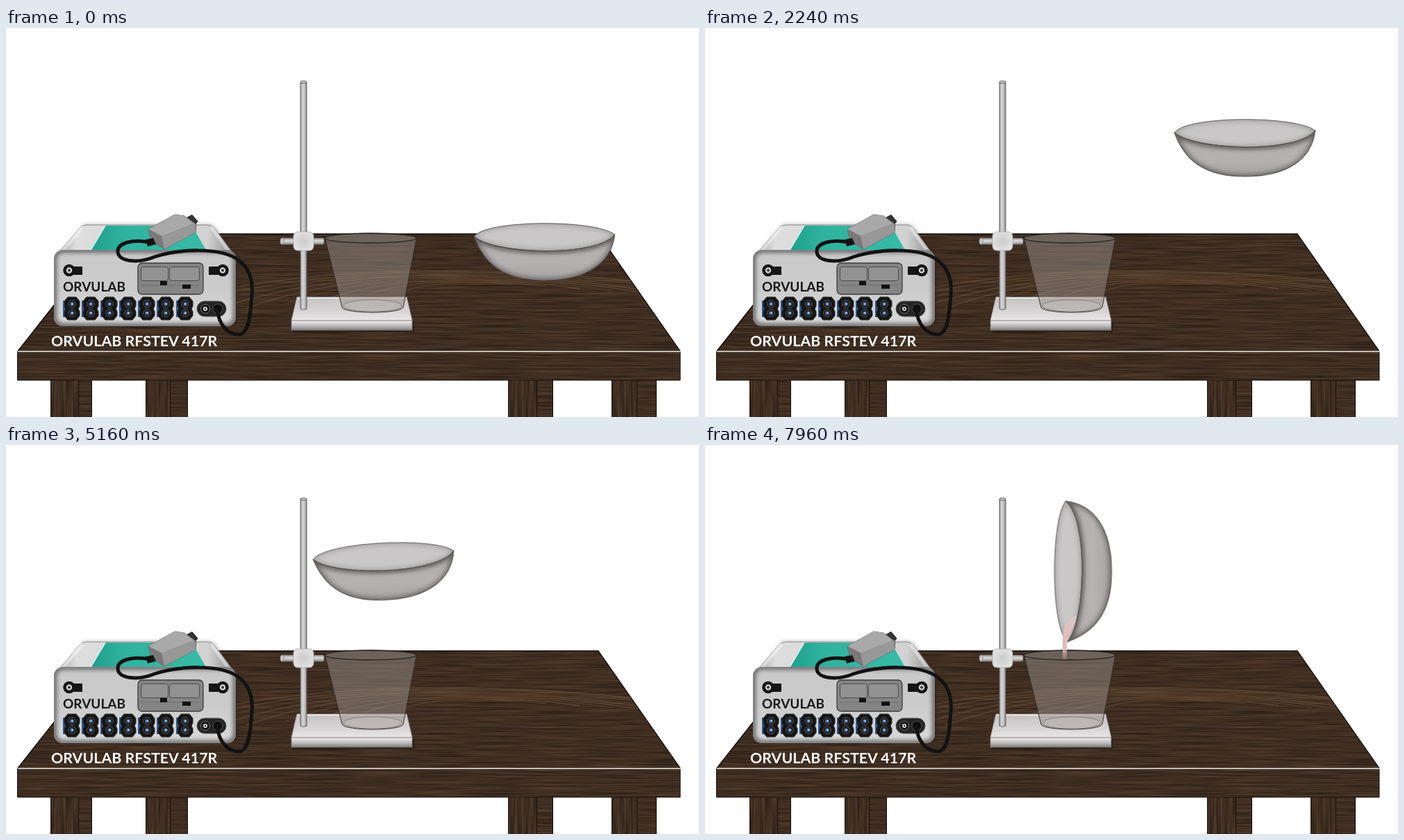
Animation of 998 by 561 pixels, one loop 8000 ms. Source, as an HTML page:

```html
<!DOCTYPE html>
<html lang="en">
<head>
<meta charset="utf-8">
<title>Filling the beaker</title>
<style>
  html, body { margin: 0; width: 100%; height: 100%; overflow: hidden; background: #fff; }
  svg { position: absolute; left: 0; top: 0; width: 998px; height: 561px; display: block; }
  text { font-family: Lato, "Open Sans", sans-serif; font-weight: 700; }
  #bowl { transform: translate(775px, 323px); }
</style>
</head>
<body>
<svg viewBox="0 0 998 561">
  <defs>
    <filter id="grain" x="0" y="0" width="100%" height="100%" color-interpolation-filters="sRGB">
      <feTurbulence type="fractalNoise" baseFrequency=".012 .45" numOctaves="3" seed="7"/>
      <feColorMatrix values=".24 0 0 0 .125  .18 0 0 0 .088  .13 0 0 0 .063  0 0 0 0 1"/>
      <feComposite in2="SourceGraphic" operator="in"/>
    </filter>
    <filter id="legGrain" x="0" y="0" width="100%" height="100%" color-interpolation-filters="sRGB">
      <feTurbulence type="fractalNoise" baseFrequency=".3 .015" numOctaves="3" seed="4"/>
      <feColorMatrix values=".24 0 0 0 .125  .18 0 0 0 .088  .13 0 0 0 .063  0 0 0 0 1"/>
      <feComposite in2="SourceGraphic" operator="in"/>
    </filter>
    <filter id="soft" x="-20%" y="-20%" width="140%" height="140%"><feGaussianBlur stdDeviation="3"/></filter>
    <filter id="soft1" x="-20%" y="-20%" width="140%" height="140%"><feGaussianBlur stdDeviation="1.3"/></filter>
    <linearGradient id="pole">
      <stop offset="0" stop-color="#a0a0a0"/><stop offset=".35" stop-color="#d4d4d4"/>
      <stop offset=".65" stop-color="#c6c6c6"/><stop offset="1" stop-color="#8c8c8c"/>
    </linearGradient>
    <linearGradient id="bar" x2="0" y2="1">
      <stop offset="0" stop-color="#999"/><stop offset=".45" stop-color="#dcdcdc"/><stop offset="1" stop-color="#888"/>
    </linearGradient>
    <linearGradient id="plate" x2="0" y2="1">
      <stop offset="0" stop-color="#c4c1c1"/><stop offset=".6" stop-color="#d6d4d4"/><stop offset="1" stop-color="#e8e6e6"/>
    </linearGradient>
    <linearGradient id="plateFront" x2="0" y2="1">
      <stop offset="0" stop-color="#f0efef"/><stop offset=".55" stop-color="#bcb9b9"/><stop offset="1" stop-color="#7d7a7a"/>
    </linearGradient>
    <radialGradient id="knob">
      <stop offset="0" stop-color="#cbcbcb"/><stop offset="1" stop-color="#e0e0e0"/>
    </radialGradient>
    <linearGradient id="lid">
      <stop offset="0" stop-color="#9c9c9c"/><stop offset=".12" stop-color="#dedede"/>
      <stop offset=".85" stop-color="#d2d2d2"/><stop offset="1" stop-color="#858585"/>
    </linearGradient>
    <linearGradient id="face" x2="0" y2="1">
      <stop offset="0" stop-color="#c9c9c9"/><stop offset=".5" stop-color="#cbcbcb"/><stop offset="1" stop-color="#dadada"/>
    </linearGradient>
    <linearGradient id="teal">
      <stop offset="0" stop-color="#1f9f8c"/><stop offset=".3" stop-color="#2fb39f"/><stop offset="1" stop-color="#37bba7"/>
    </linearGradient>
    <linearGradient id="shell" x2="0" y2="1">
      <stop offset="0" stop-color="#aeaaaa"/><stop offset=".6" stop-color="#b6b2b2"/><stop offset="1" stop-color="#a8a4a4"/>
    </linearGradient>
    <linearGradient id="fade" x2="0" y2="1">
      <stop offset=".8" stop-color="#fff"/><stop offset="1" stop-color="#000"/>
    </linearGradient>
    <linearGradient id="liquid" x2="0" y2="1">
      <stop offset="0" stop-color="#d9c9c9"/><stop offset=".4" stop-color="#e2bdbb"/><stop offset="1" stop-color="#dfb6b3"/>
    </linearGradient>
    <path id="shellShape" d="M-101-22C-87 16-60 41 0 41C63 41 97 15 101.500-25C75 8-70 4-101-22Z"/>
    <path id="mouthShape" d="M-101-22C-85-47 75-47 101.500-25C75 8-70 4-101-22Z"/>
    <path id="frontRim" d="M-101-22C-70 4 75 8 101.500-25"/>
    <clipPath id="topClip"><path d="M150 297H853L971 466H17Z"/></clipPath>
    <clipPath id="faceClip"><rect x="69" y="320" width="262" height="110" rx="13"/></clipPath>
    <clipPath id="shellClip"><use href="#shellShape"/></clipPath>
    <clipPath id="mouthClip"><use href="#mouthShape"/></clipPath>
    <mask id="wipe" maskUnits="userSpaceOnUse" x="490" y="230" width="70" height="90">
      <rect id="wipeEdge" x="490" y="-100" width="70" height="100" fill="url(#fade)"/>
    </mask>
  </defs>

  <!-- table -->
  <g id="legs"></g>
  <path d="M150 297H853L971 466H17Z" filter="url(#grain)"/>
  <g id="rings" clip-path="url(#topClip)" fill="none" stroke="#8e7050" stroke-opacity=".32"></g>
  <path d="M17 466L150 297H853L971 466" fill="none" stroke="#0e0805" stroke-width="1.300"/>
  <rect x="16" y="466" width="955" height="42" filter="url(#grain)"/>
  <path d="M16.500 467V508H971V467" fill="none" stroke="#1c120c"/>
  <path d="M17 466.500H971" stroke="#f4f0ec" stroke-width="1.400"/>

  <!-- stand -->
  <path d="M411 424H587V438H413Z" opacity=".5" filter="url(#soft1)"/>
  <path d="M419 388H577L585 422H411Z" fill="url(#plate)" stroke="#a09c9c" stroke-width=".8"/>
  <path d="M420 389.500H576" stroke="#f2f1f1" stroke-width="1.500"/>
  <rect x="411" y="422" width="174" height="14" fill="url(#plateFront)" stroke="#777373" stroke-width=".8"/>
  <path d="M424 78V405Q428.500 408 433 405V78Z" fill="url(#pole)" stroke="#555" stroke-width=".9"/>
  <ellipse cx="428.500" cy="78" rx="4.500" ry="1.800" fill="#c8c8c8" stroke="#444" stroke-width=".8"/>
  <rect x="396" y="303" width="62" height="9" rx="2" fill="url(#bar)" stroke="#777" stroke-width=".7"/>
  <ellipse cx="397.500" cy="307.500" rx="2.500" ry="4.500" fill="#c9c9c9" stroke="#777" stroke-width=".7"/>
  <rect x="414" y="294" width="29" height="27" rx="6" fill="url(#knob)" stroke="#a5a5a5" stroke-width=".8"/>

  <!-- beaker -->
  <path d="M459.500 303C470 294 580 294 591 303L572 403C566 412.500 490 412.500 484 403Z" fill="#97908a" fill-opacity=".5" stroke="#332f2c"/>
  <ellipse cx="525" cy="303" rx="66" ry="7" fill="#6f6660" fill-opacity=".4" stroke="#262321" stroke-width="1.300"/>
  <ellipse cx="528" cy="400.500" rx="42" ry="8.500" fill="#d0cdcb" fill-opacity=".3" stroke="#7c7774" stroke-width=".8"/>

  <!-- instrument -->
  <path d="M112 284H292Q299 284 303 291L331 338V426H75V330Z" opacity=".35" filter="url(#soft)"/>
  <path d="M116 284H290Q297 284 301 290L329 328Q331 334 326 336H74Q68 334 72 328L106 289Q110 284 116 284Z" fill="url(#lid)" stroke="#777" stroke-width=".8"/>
  <path d="M110 287L78 325M296 287L323 325" stroke="#fff" stroke-width="5" opacity=".5" filter="url(#soft1)"/>
  <path d="M143 285H268L289 322H121Z" fill="url(#teal)"/>
  <path d="M143 285L121 322" stroke="#d8f2ed" stroke-width="1.500"/>
  <rect x="69" y="320" width="262" height="110" rx="13" fill="url(#face)"/>
  <g clip-path="url(#faceClip)">
    <rect x="69" y="320" width="262" height="110" rx="13" fill="none" stroke="#666" stroke-width="8" filter="url(#soft)"/>
    <path d="M80 325H320" stroke="#fff" stroke-width="5" filter="url(#soft1)"/>
  </g>
  <rect x="69.500" y="320.500" width="261" height="109" rx="13" fill="none" stroke="#858585" stroke-width=".8"/>
  <g id="lugs"></g>
  <rect x="190" y="339" width="94" height="45" rx="6" fill="#858585" stroke="#3c3c3c" stroke-width="1.300"/>
  <g fill="#929292" stroke="#4c4c4c">
    <rect x="194.500" y="344.500" width="39" height="20" rx="3"/><rect x="235.500" y="344.500" width="43" height="20" rx="3"/>
    <path d="M195 371H278" stroke="#6d6d6d"/>
  </g>
  <path d="M222 365h10v6h-10zM254 370h12v6h-12z" fill="#111"/>
  <text x="82" y="379.500" font-size="19" fill="#161616">ORVULAB</text>
  <text x="65" y="458.500" font-size="21.400" fill="#fff">ORVULAB RFSTEV 417R</text>
  <g id="sockets"></g>
  <rect x="275" y="394" width="42" height="22" rx="11" fill="#242424" stroke="#555"/>
  <circle cx="287" cy="405" r="6.500" fill="#0d0d0d" stroke="#777"/>
  <circle cx="287" cy="405" r="3" fill="#e2e2e2"/><circle cx="287" cy="405" r="1.200"/>
  <circle cx="305" cy="405" r="7" fill="#0d0d0d" stroke="#555"/>

  <!-- adapter and cable -->
  <path d="M258 275L268 269.500L276 279L268 288Z" fill="#333" stroke="#181818"/>
  <path d="M205 290L243 269L257 271L274 283L273 295L228 319L209 307Z" fill="#8d8d8d" stroke="#555" stroke-width=".8"/>
  <path d="M205 290L243 269L257 271L270 282L224 300Z" fill="#a9a9a9"/>
  <path d="M224 300L271 282L273 295L228 319Z" fill="#989898"/>
  <path d="M205 290L224 300L228 319L209 307Z" fill="#797979"/>
  <path d="M201 305L212 303L216 312L204 315Z" fill="#151515"/>
  <path d="M207 309C182 304 160 310 161 323C162 337 190 340 214 330C247 319 310 315 335 335C356 350 356 375 353 396C351 427 346 442 335 442C318 442 306 426 304 405" fill="none" stroke="#121212" stroke-width="5" stroke-linecap="round"/>
</svg>

<svg viewBox="0 0 998 561">
  <g id="bowl" fill="none" stroke="#4e4a4a">
    <use href="#shellShape" fill="url(#shell)" stroke="none"/>
    <g clip-path="url(#shellClip)">
      <use href="#shellShape" stroke-width="6" opacity=".7" filter="url(#soft)"/>
      <use href="#frontRim" stroke-width="4" opacity=".6" filter="url(#soft)"/>
    </g>
    <use href="#mouthShape" fill="#c9c7c7" stroke="none"/>
    <g clip-path="url(#mouthClip)">
      <use href="#mouthShape" stroke-width="4" opacity=".4" filter="url(#soft)"/>
    </g>
    <use href="#mouthShape" stroke-width=".9"/>
    <use href="#shellShape" stroke-width="1.100"/>
  </g>
  <path d="M535 245C522 252 516 263 515 281V310H521V288C522 275 534 262 535 245Z" fill="url(#liquid)" mask="url(#wipe)"/>
</svg>

<script>
const LOOP = 8000;
const byId = id => document.getElementById(id);
const fill = (id, items, draw) => byId(id).innerHTML = items.map(draw).join('');

// left edge, fold, right edge
fill('legs', [[64, 104, 124], [201, 236, 262], [723, 764, 788], [872, 908, 937]], ([a, b, c]) => `
  <rect x="${a}" y="506" width="${b - a}" height="56" filter="url(#legGrain)"/>
  <rect x="${b}" y="506" width="${c - b}" height="56" filter="url(#grain)"/>
  <path d="M${a + .5} 508V561M${b + .5} 508V561M${c - .5} 508V561" stroke="#150d08"/>`);

fill('rings', [...Array(9).keys()], i => {
  const rise = 10 + i * 9, reach = 70 + i * 48;
  return `<path d="M${660 - reach * 1.2} ${372 + rise * .7}Q${640 - reach * .3} ${372 - rise} ${660 + reach} ${366 + rise * .35}" stroke-width="${1 + i % 3 * .4}"/>`;
});

fill('lugs', [[91, 96], [312, 292]], ([x, barX]) => `
  <rect x="${barX}" y="344" width="14" height="12" fill="#151515"/>
  <circle cx="${x}" cy="349.500" r="6.500" fill="#d4d4d4" stroke="#151515" stroke-width="4.500"/>
  <circle cx="${x}" cy="349.500" r="2" fill="#333"/>`);

fill('sockets', [95, 122, 149, 176, 203, 230, 258], x => `
  <rect x="${x - 13}" y="393" width="4" height="24" fill="#2a5a9c"/>
  <path d="M${x - 6} 388h12l5 6v7l-2 4l2 4v6l-5 6h-12l-5-6v-6l2-4l-2-4v-7z" fill="#151515" stroke="#2c2c2c"/>
  ${[398, 411].map(y => `
    <circle cx="${x}" cy="${y}" r="5.500" fill="#222" stroke="#4c4c4c"/>
    <circle cx="${x}" cy="${y}" r="2.500" fill="#4b7cbd"/>
    <circle cx="${x + .5}" cy="${y}" r="1" fill="#dce8f6"/>`).join('')}`);

function play(el, steps) {
  el.animate(
    steps.map(([time, transform]) => ({ offset: time / LOOP, transform })),
    { duration: LOOP, iterations: Infinity }
  );
}

const pose = (x, y, turn = 0) => `translate(${x}px, ${y}px) rotate(${turn}deg)`;
play(byId('bowl'), [
  [0, pose(775, 323)],
  [2630, pose(777.5, 147)],
  [4600, pose(544.5, 147)],
  [5100, pose(544.5, 182.5)],
  [7100, pose(544.5, 182.5, -90)],
  [LOOP, pose(544.5, 182.5, -90)]
]);

const edge = y => `translate(0px, ${y}px)`;
play(byId('wipeEdge'), [
  [0, edge(240)],
  [7260, edge(245)],
  [LOOP, edge(316)]
]);
</script>
</body>
</html>
```
